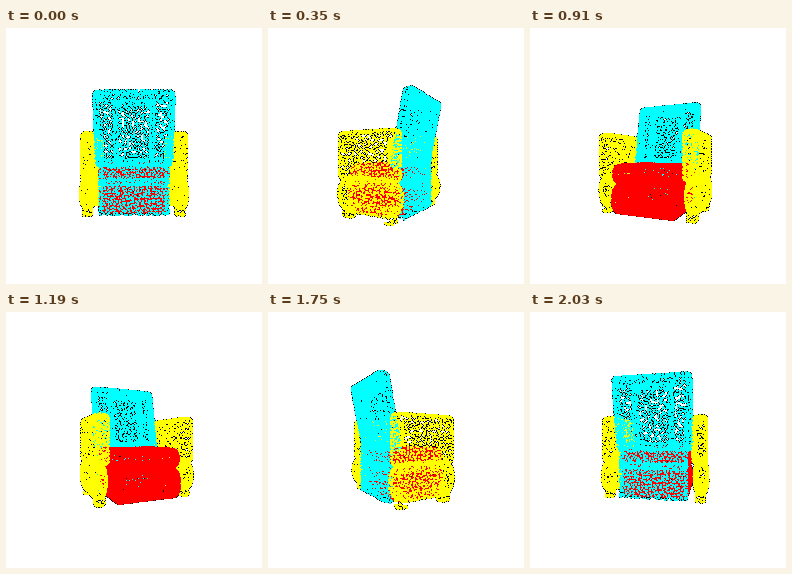
Recreate the animation shown at these times as a matplotlib script. Size 256x256 px, loop 2100 ms.

```python
import numpy as np
import matplotlib.pyplot as plt
from matplotlib.animation import FuncAnimation

SIZE, FRAMES, LOOP = 256, 30, 2100
FOCAL = SIZE / 2 / np.tan(np.radians(30))
DOT = 1.05
STEP = 2.8
CYAN, YELLOW, RED = (0, 255, 255), (255, 255, 0), (255, 0, 0)

rng = np.random.default_rng(7)
clouds, tints = [], []


def jittered(lo, hi, step):
    """Evenly spread samples over a rectangle."""
    counts = np.maximum(1, np.rint((hi - lo) / step)).astype(int)
    cells = np.stack(np.meshgrid(*map(np.arange, counts), indexing="ij"), -1)
    cells = cells.reshape(-1, 2) + 0.5
    cells += rng.uniform(-0.42, 0.42, cells.shape)
    return lo + cells / counts * (hi - lo)


def add(points, color, rake=0):
    points = points.copy()
    points[:, 2] += rake * points[:, 1]
    clouds.append(points)
    tints.append(np.tile(np.uint8(color), (len(points), 1)))


def box(x, y, z, color, r=None, step=STEP, rake=0):
    """Sampled surface of a box; r is the edge radius, one or per axis."""
    lo, hi = np.array([x, y, z], float).T
    sides = []
    for axis in range(3):
        rest = [i for i in range(3) if i != axis]
        for level in (lo[axis], hi[axis]):
            uv = jittered(lo[rest], hi[rest], step)
            side = np.full((len(uv), 3), level)
            side[:, rest] = uv
            sides.append(side)
    pts = np.vstack(sides)
    if r is not None:
        r = np.broadcast_to(r, 3)
        core = np.clip(pts, lo + r, hi - r)
        out = (pts - core) / r
        pts = core + r * out / np.linalg.norm(out, axis=1, keepdims=True)
    add(pts, color, rake)


def sheet(x, y, z, color, step=STEP):
    lo, hi = np.array([x, y], float).T
    xy = jittered(lo, hi, step)
    add(np.column_stack([xy, np.full(len(xy), z)]), color)


def mirrored(x, *args, **kw):
    box(x, *args, **kw)
    box((-x[1], -x[0]), *args, **kw)


# Backrest, leaning, with an inset panel and a lower rear cover
LEAN = 0.2
box((-35.2, 35.2), (-10, 56.3), (14.5, 25), CYAN, r=5, rake=LEAN)
mirrored((31, 35), (-4, 51), (17, 23), CYAN, r=1.5, rake=LEAN)
box((-31, 31), (48, 54), (17, 23), CYAN, r=1.5, rake=LEAN)
mirrored((15, 18), (-4, 47), (13, 22), CYAN, rake=LEAN)
box((-18, 18), (45, 48), (13, 22), CYAN, rake=LEAN)
sheet((-30, 30), (-53, -8), 25, CYAN, step=2.1)
for low, high in ((-8, -3), (-26, -21)):
    box((-31, 31), (low, high), (21, 25), CYAN, step=2.2)
mirrored((28.5, 31), (-52, 22), (21, 25), CYAN)

# Arms: upright block, rolled lower part, feet
mirrored((35, 48), (-21, 21.5), (-33, 27), YELLOW, r=(5, 4, 5))
mirrored((36, 49), (-49, -18), (-34.5, 30), YELLOW, r=(5, 14, 14))
for z in ((-29, -19), (15, 24)):
    mirrored((38, 46), (-54, -47), z, YELLOW, r=2)

# Seat: cushion over base
box((-33, 33), (-26, -8), (-34, 19), RED, r=7, step=1.9)
box((-32, 32), (-53, -26), (-37, 21), RED, r=(6, 10, 8), step=1.9)

POINTS, COLORS = np.vstack(clouds), np.vstack(tints)
OFFSETS = np.array([(i, j) for i in (-1, 0, 1) for j in (-1, 0, 1)])


def render(k):
    a = 2 * np.pi * k / FRAMES
    x, y, z = POINTS.T
    depth = z * np.cos(a) - x * np.sin(a)
    scale = FOCAL / (FOCAL - depth)
    px = SIZE / 2 + scale * (x * np.cos(a) + z * np.sin(a))
    py = SIZE / 2 - scale * y

    # Paint far to near so that closer dots cover
    order = np.argsort(depth)
    spots = np.column_stack([px, py])[order]
    cells = np.floor(spots)[:, None] + OFFSETS
    hit = np.hypot(*np.moveaxis(cells + 0.5 - spots[:, None], -1, 0)) <= DOT
    cols, rows = cells[hit].astype(int).T
    img = np.full((SIZE, SIZE, 3), 255, np.uint8)
    img[rows, cols] = np.repeat(COLORS[order], hit.sum(1), axis=0)

    # Empty pixels squeezed between dots turn black
    full = np.zeros((SIZE, SIZE), int)
    full[rows, cols] = 1
    near = sum(np.roll(full, s, ax) for s in (-1, 1) for ax in (0, 1))
    img[(full == 0) & (near >= 2)] = 0
    return img


fig = plt.figure(figsize=(SIZE / 100, SIZE / 100), dpi=100, facecolor="white")
ax = fig.add_axes([0, 0, 1, 1])
ax.axis("off")
view = ax.imshow(render(0), interpolation="nearest", aspect="auto")


def update(k):
    view.set_data(render(k))
    return (view,)


anim = FuncAnimation(fig, update, frames=FRAMES, interval=LOOP / FRAMES,
                     repeat=True, repeat_delay=0, blit=False)
plt.show()
```
